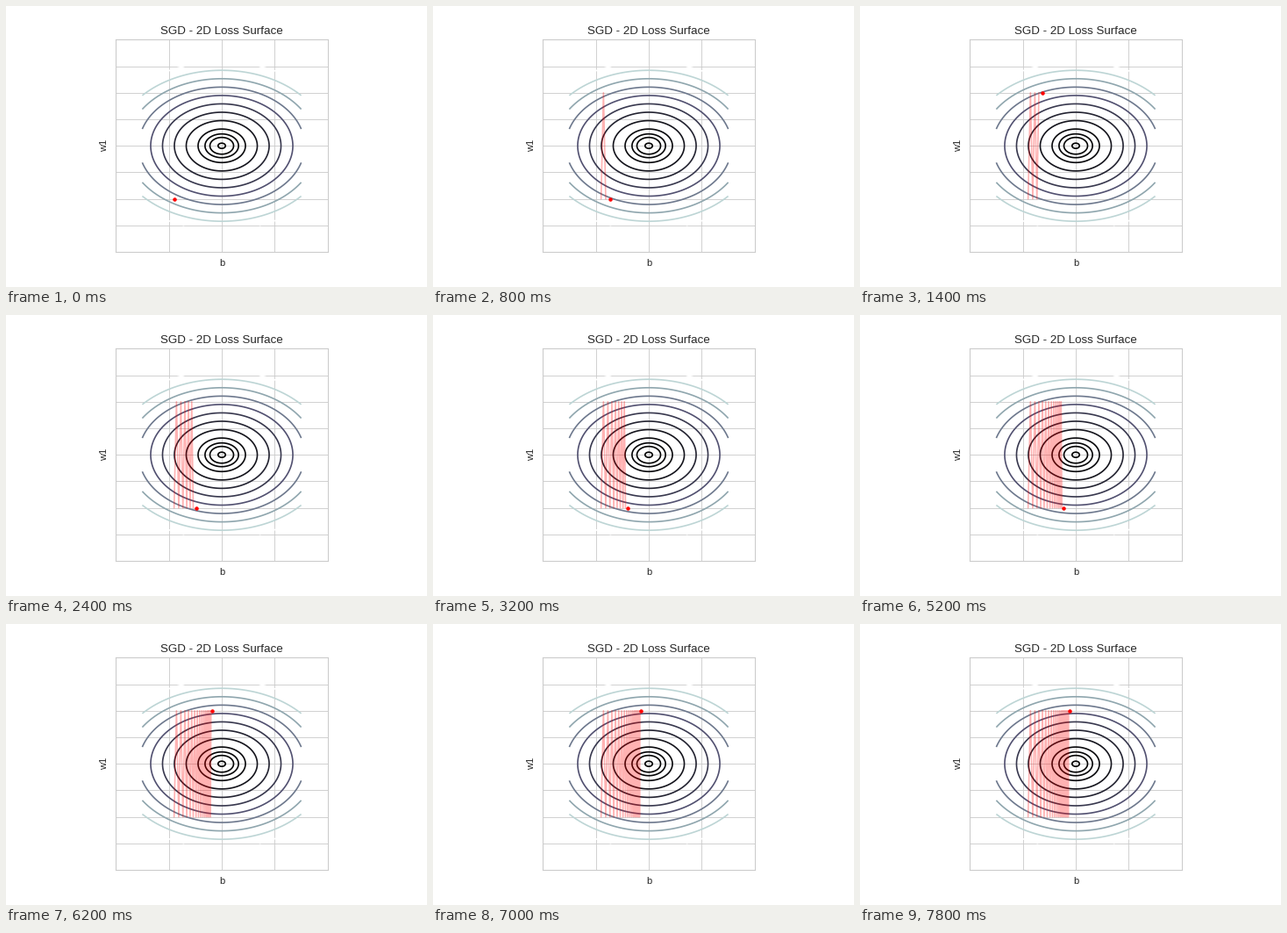
A matplotlib script that plays this animation: 480x320 px, repeating every 8 s.

```python
import numpy as np
import matplotlib.pyplot as plt
from matplotlib.animation import FuncAnimation

FRAMES = 40
INTERVAL = 200
LIMIT = 4

plt.rcParams.update({
    "font.family": "Liberation Sans",
    "font.size": 10,
    "text.color": ".15",
    "axes.labelcolor": ".15",
    "axes.edgecolor": ".8",
    "axes.linewidth": 1.0,
    "axes.axisbelow": True,
    "axes.grid": True,
    "grid.color": ".8",
    "grid.linewidth": 0.8,
    "lines.linewidth": 1.5,
    "lines.solid_capstyle": "round",
    "xtick.major.size": 0,
    "ytick.major.size": 0,
})

fig, ax = plt.subplots(figsize=(6, 4), dpi=80)
fig.subplots_adjust(left=0.125, right=0.9, bottom=0.125, top=0.88)
ax.set_aspect("equal")
ax.set_xlim(-LIMIT, LIMIT)
ax.set_ylim(-LIMIT, LIMIT)
ax.set_xticks(range(-LIMIT, LIMIT + 1, 2), labels=[])
ax.set_yticks(range(-LIMIT, LIMIT + 1), labels=[])
ax.set_title("SGD - 2D Loss Surface")
ax.set_xlabel("b")
ax.set_ylabel("w1")

# Quadratic bowl with quadratically spaced level curves
span = np.linspace(-3, 3, 200)
b_grid, w_grid = np.meshgrid(span, span)
loss = b_grid**2 + 2 * w_grid**2
levels = np.sort(np.append(0.2 * np.arange(1, 11) ** 2, [0.02, 0.4]))
ax.contour(b_grid, w_grid, loss, levels=levels, cmap="bone", vmin=0, vmax=20)

# b shrinks by 5% per step while w1 bounces across the valley
steps = np.arange(FRAMES)
b_path = -1.8 * 0.95**steps
w_path = -2.0 * (-1.0) ** steps

trail, = ax.plot([], [], color="red", alpha=0.3)
dot, = ax.plot([], [], "o", color="red", markersize=3)


def draw(i):
    # The trail runs two steps behind the dot
    end = max(i - 1, 0)
    trail.set_data(b_path[:end], w_path[:end])
    dot.set_data([b_path[i]], [w_path[i]])
    return trail, dot


anim = FuncAnimation(fig, draw, frames=FRAMES, interval=INTERVAL,
                     init_func=lambda: draw(0), repeat=True, repeat_delay=0)
plt.show()
```
